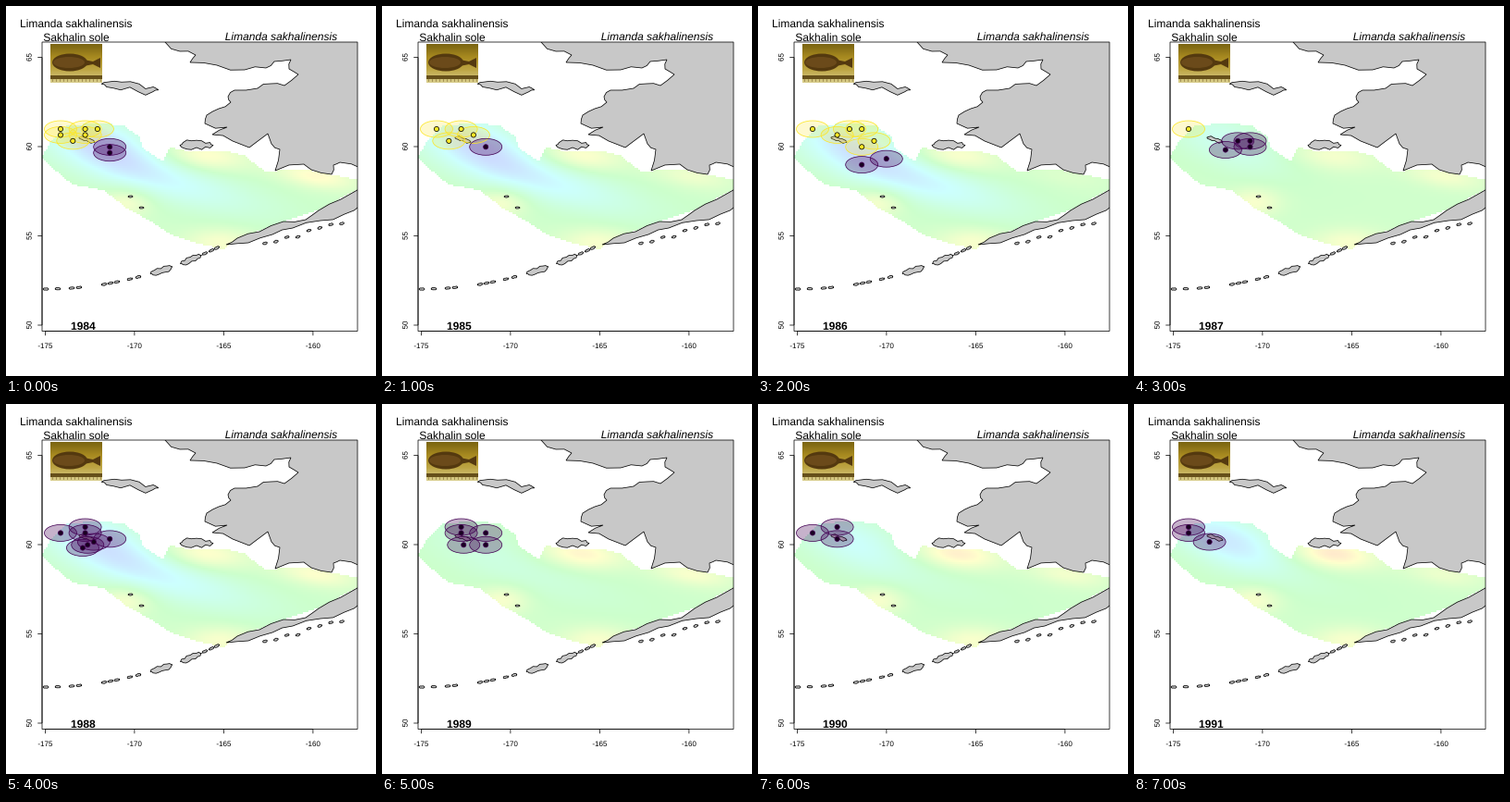
Animation of 400x400 px, one loop 8 s. Source, as a matplotlib script:

```python
import numpy as np
import matplotlib.pyplot as plt
from matplotlib.animation import FuncAnimation
from matplotlib.colors import LinearSegmentedColormap
from matplotlib.patches import (Circle, Ellipse, PathPatch, Polygon,
                                Rectangle)
from matplotlib.path import Path
from matplotlib.textpath import TextPath
from matplotlib.transforms import Affine2D

DPI = 100
PX = 72 / DPI
THIN = 0.75 * PX
PURPLE, YELLOW, LAND = "#440154", "#fde725", "#c8c8c8"
FIRST_YEAR = 1984
LEFT, TOP, RIGHT, BOTTOM = 39, 39, 380, 351.5
DEGREE = 19.3
rng = np.random.default_rng(4)

fig = plt.figure(figsize=(4, 4), dpi=DPI, facecolor="white")
ax = fig.add_axes([0, 0, 1, 1])
ax.axis("off")


def label(x, y, s, size=12, center=True, turn=0, **font):
    path = TextPath((0, 0), s, size=size,
                    prop={"family": "Liberation Sans", **font})
    shift = -path.get_extents().intervalx.mean() if center else 0
    place = Affine2D().translate(shift, 0).rotate_deg(turn).scale(1, -1)
    return ax.add_patch(PathPatch(
        place.translate(x, y).transform_path(path), fc="black", lw=0,
        zorder=20))


def line(xs, ys):
    ax.plot(xs, ys, color="black", lw=THIN, zorder=15, snap=False,
            solid_capstyle="butt")


# ---- frame, axes and titles ----
frame_box = Rectangle((LEFT, TOP), RIGHT - LEFT, BOTTOM - TOP, fill=False,
                      ec="black", lw=THIN, zorder=15, snap=False)
ax.add_patch(frame_box)

lon_x = [42.4 + 5 * DEGREE * i for i in range(4)]
lat_y = [55.5 + 5 * DEGREE * i for i in range(4)]
line([lon_x[0], lon_x[-1]], [BOTTOM, BOTTOM])
line([LEFT, LEFT], [lat_y[0], lat_y[-1]])
for i, (x, y) in enumerate(zip(lon_x, lat_y)):
    line([x, x], [BOTTOM, BOTTOM + 4.75])
    line([LEFT - 4.75, LEFT], [y, y])
    label(x, 370, str(-175 + 5 * i), 8)
    label(27.6, y, str(65 - 5 * i), 8, turn=90)

label(76, 23, "Limanda sakhalinensis")
label(76, 38, "Sakhalin sole")
label(297.5, 37, "Limanda sakhalinensis", style="italic")


# ---- coastline: key points with seeded roughness between them ----
def roughen(points, amount):
    points = np.array(points, float)
    step = np.roll(points, -1, axis=0) - points
    normal = np.column_stack([-step[:, 1], step[:, 0]])
    offset = rng.uniform(-amount, amount, (len(points), 1)) * normal
    return np.stack([points, points + step / 2 + offset], 1).reshape(-1, 2)


def land(points, amount=0.15):
    patch = Polygon(roughen(points, amount), fc=LAND, ec="black", lw=THIN,
                    zorder=5)
    ax.add_patch(patch)
    patch.set_clip_path(frame_box)


def island(x, y, length, height, tilt=0):
    a = np.linspace(0, 2 * np.pi, 10, endpoint=False)
    oval = np.column_stack([length / 2 * np.cos(a), height / 2 * np.sin(a)])
    land(Affine2D().rotate_deg(tilt).translate(x, y).transform(oval), 0.25)


MAINLAND = [(385, 30), (171, 30), (172, 39), (188, 49), (205, 53), (199, 61),
            (228, 64), (258, 69), (281, 67), (290, 60), (308, 58), (306, 68),
            (316, 74), (301, 86), (286, 84), (272, 89), (247, 91), (240, 98),
            (243, 104), (230, 111), (217, 118), (215, 127), (239, 131),
            (223, 139), (245, 146), (263, 153), (283, 138), (287, 149),
            (296, 155), (291, 178), (322, 171), (330, 177), (352, 182),
            (354, 172), (361, 169), (385, 176)]
PENINSULA = [(385, 196), (362, 209), (338, 221), (324, 231), (300, 233),
             (274, 244), (250, 251), (238, 258), (262, 256), (288, 247),
             (310, 240), (340, 232), (366, 225), (385, 214)]
land(MAINLAND)
land(PENINSULA, 0.1)
island(134, 87.5, 62, 9, 6)
island(206, 150.5, 36, 10)
island(87.5, 144.5, 18, 4, 16)
island(134.5, 206, 5, 2)
island(146.5, 218, 5, 2)


def arc(x):
    return 306 - 0.0013 * (x - 43) ** 2


for x in (43, 56, 71, 79, 106, 113, 120, 134, 143, 168, 200, 215, 222, 228):
    big = 160 < x < 205
    length, height = (25, 7) if big else (6, 2.5)
    tilt = np.degrees(np.arctan2(arc(x + 1) - arc(x), 1))
    island(x, arc(x), length, height, tilt)
for x in np.linspace(280, 363, 8):
    island(x, 258 - 0.3 * (x - 280) + rng.uniform(-3, 3), 5, 2.5, -15)

# ---- specimen picture, reduced to flat tones ----
tones = LinearSegmentedColormap.from_list(
    "tones", ["#7a6412", "#a88a20", "#bda544", "#d8cd8c"])
ax.imshow(np.linspace(0, 1, 42)[:, None], cmap=tones, aspect="auto",
          extent=(48, 104, 83, 41), zorder=16)
ax.add_patch(Rectangle((48, 75), 56, 4, fc="#66501a", zorder=17))
for x in range(50, 104, 4):
    ax.plot([x, x], [79, 81], color="#8a7540", lw=0.5, zorder=17)
ax.add_patch(Ellipse((69, 61), 38, 19, fc="#54390f", zorder=18))
ax.add_patch(Polygon([(84, 58), (94, 60), (102, 56), (102, 67), (94, 63),
                      (84, 65)], fc="#54390f", zorder=18))
ax.add_patch(Ellipse((68, 61), 34, 12, fc="#6b4a1a", zorder=18))

# ---- temperature field over the survey region ----
REGION = [(39, 163), (48, 147), (66, 130), (100, 126), (128, 130), (145, 142),
          (147, 153), (169, 168), (177, 153), (205, 158), (235, 156),
          (258, 162), (280, 179), (320, 176), (380, 188), (380, 198),
          (342, 219), (300, 233), (250, 252), (235, 263), (205, 256),
          (178, 247), (162, 236), (130, 218), (105, 199), (72, 193),
          (50, 175)]
CELL = 2
gx, gy = np.meshgrid(np.arange(LEFT, RIGHT, CELL) + CELL / 2,
                     np.arange(121, 271, CELL) + CELL / 2)
outside = ~Path(REGION).contains_points(
    np.column_stack([gx.ravel(), gy.ravel()])).reshape(gx.shape)


def blob(x, y, width, height, slope=0):
    dx = (gx - x) / width
    dy = (gy - y - slope * (gx - x)) / height
    return np.exp(-(dx ** 2 + dy ** 2) / 2)


NORTHWEST = blob(100, 147, 45, 20, 0.3)
TONGUE = blob(175, 190, 75, 17, 0.25)
COAST = blob(215, 162, 32, 11, 0.1)
EAST = blob(335, 184, 30, 9, 0.15)
EDGE = blob(130, 212, 20, 11) + blob(232, 256, 28, 11)


def coldness(northwest, tongue, coast, east):
    return (0.48 + northwest * NORTHWEST + tongue * TONGUE - coast * COAST
            - east * EAST - 0.2 * EDGE)


pastel = LinearSegmentedColormap.from_list(
    "pastel", ["#ffcccc", "#ffffcc", "#ccffcc", "#ccffff", "#ccccff"])
pastel.set_bad((1, 1, 1, 0))
field = ax.imshow(np.zeros(gx.shape), cmap=pastel, vmin=0, vmax=1,
                  interpolation="nearest", aspect="auto", zorder=2,
                  extent=(LEFT, LEFT + CELL * gx.shape[1],
                          121 + CELL * gx.shape[0], 121))
field.set_clip_path(frame_box)

# ---- per year: field strengths, yellow stations, purple stations ----
# stations are (column, row) on the survey grid
YEARS = [
    ((0.40, 0.24, 0.24, 0.25),
     [(0, 0), (0, 1), (2, 0), (3, 0), (2, 1), (1, 2)], [(4, 3), (4, 4)]),
    ((0.37, 0.26, 0.23, 0.15),
     [(0, 0), (2, 0), (3, 1), (1, 2)], [(4, 3)]),
    ((0.34, 0.28, 0.22, 0.06),
     [(0, 0), (3, 0), (4, 0), (2, 1), (5, 2), (4, 3)], [(4, 6), (6, 5)]),
    ((0.20, 0.00, 0.18, 0.18),
     [(0, 0)], [(4, 2), (5, 2), (5, 3), (3, 3.5)]),
    ((0.34, 0.24, 0.24, 0.22),
     [], [(0, 1), (2, 0), (2, 1), (4, 2), (2.7, 2.5), (2.2, 3), (1.8, 3.5)]),
    ((0.10, 0.08, 0.28, 0.20),
     [], [(2, 0), (2, 1), (4, 1), (2.2, 3), (4, 3)]),
    ((0.24, 0.06, 0.31, 0.17), [], [(0, 1), (2, 0), (2, 2)]),
    ((0.36, 0.04, 0.34, 0.14), [], [(0, 0), (0, 1), (1.7, 2.5)]),
]
marks = []


def draw(i):
    while marks:
        marks.pop().remove()
    strengths, *catches = YEARS[i]
    field.set_data(np.ma.masked_where(outside, coldness(*strengths)))
    marks.append(label(70, 350, str(FIRST_YEAR + i), center=False,
                       weight="bold"))
    styles = ((YELLOW, 0.22, YELLOW, "black"),
              (PURPLE, 0.3, "#180020", PURPLE))
    for (color, alpha, dot, rim), stations in zip(styles, catches):
        for col, row in stations:
            p = 59 + 13.3 * col, 133 + DEGREE / 3 * row
            marks.extend(map(ax.add_patch, (
                Ellipse(p, 35, 18, fc=color, alpha=alpha, lw=0, zorder=8),
                Ellipse(p, 35, 18, fill=False, ec=color, lw=THIN, zorder=9),
                Circle(p, 2.6, fc=dot, ec=rim, lw=THIN, zorder=10))))


ax.set_xlim(0, 400)
ax.set_ylim(400, 0)

anim = FuncAnimation(fig, draw, frames=len(YEARS), interval=1000,
                     init_func=lambda: None, repeat=True, repeat_delay=0)
plt.show()
```
